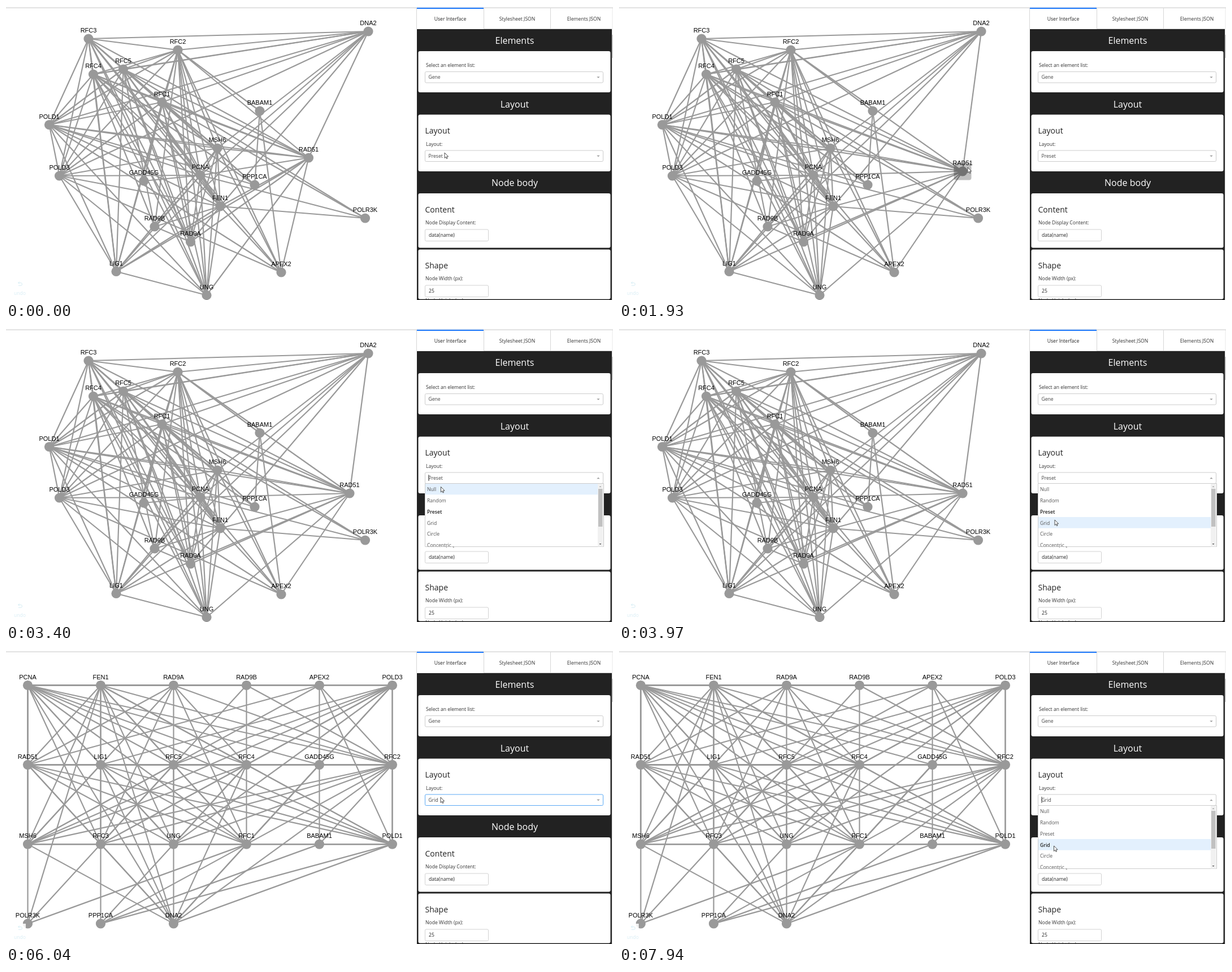
Write an HTML page with a canvas that moves like this. It is 1074x521 px and loops after 8 s.

```html
<!DOCTYPE html>
<html lang="en">
<meta charset="utf-8">
<title>Network layout editor</title>
<style>
html, body { margin: 0; width: 100%; height: 100%; overflow: hidden; background: #fff }
canvas { display: block }
</style>
<canvas id="stage" width="1074" height="521"></canvas>
<script>
const ctx = document.getElementById('stage').getContext('2d');
const LOOP = 8000, STEP = 137.3, PHASE = 1350;
const UI = '"Open Sans", sans-serif', LABEL = '"Liberation Sans", Arial, sans-serif';

// Scattered positions, listed in the reading order of the grid
const preset = {
  PCNA: [344, 300], FEN1: [379, 355], RAD9A: [326.5, 418], RAD9B: [263, 391], APEX2: [487, 472], POLD3: [94.5, 301],
  RAD51: [535.5, 269], LIG1: [195, 470.5], RFC5: [207.5, 112], RFC4: [154.5, 121], GADD45G: [244, 310], RFC2: [304, 78],
  MSH6: [374, 252], RFC3: [146, 58], UNG: [355, 512.5], RFC1: [276, 170.5], BABAM1: [449, 186], POLD1: [76.5, 210.5],
  POLR3K: [635.5, 376], PPP1CA: [440, 317], DNA2: [641, 45]
};
const names = Object.keys(preset);
const links = {
  PCNA: 'FEN1 RAD9A RAD9B APEX2 POLD3 RAD51 LIG1 RFC5 RFC4 GADD45G RFC2 MSH6 RFC3 UNG RFC1 POLD1 POLR3K DNA2',
  FEN1: 'RAD9A RAD9B APEX2 POLD3 RAD51 LIG1 RFC5 RFC4 RFC2 MSH6 RFC3 UNG RFC1 POLD1 POLR3K DNA2',
  RAD9A: 'RAD9B RFC2 RFC3 RFC4 RFC5 RFC1 RAD51 MSH6',
  RAD9B: 'RFC2 RFC5 RFC4',
  APEX2: 'POLD3 RAD51 RFC2 POLD1 BABAM1 MSH6',
  POLD3: 'LIG1 RFC5 RFC4 RFC2 MSH6 RFC3 UNG RFC1 POLD1 DNA2',
  RAD51: 'LIG1 RFC5 RFC4 RFC2 MSH6 RFC3 UNG RFC1 POLD1 DNA2',
  LIG1: 'RFC5 RFC4 RFC2 MSH6 RFC3 UNG RFC1 POLD1 DNA2',
  RFC5: 'RFC4 RFC2 RFC3 UNG RFC1 POLD1 POLR3K DNA2 MSH6',
  RFC4: 'RFC2 RFC3 UNG RFC1 POLD1 MSH6 DNA2 PPP1CA',
  GADD45G: 'RFC1',
  RFC2: 'RFC3 UNG RFC1 POLD1 MSH6 BABAM1 DNA2',
  MSH6: 'RFC3 UNG RFC1 POLD1 DNA2',
  RFC3: 'UNG RFC1 POLD1 PPP1CA DNA2',
  UNG: 'RFC1 POLD1',
  RFC1: 'POLD1 POLR3K PPP1CA DNA2',
  BABAM1: 'PPP1CA',
  POLD1: 'DNA2 PPP1CA'
};
const edges = Object.entries(links).flatMap(([a, list]) => list.split(' ').map(b => [a, b]));

// Pointer tip: time, x, y
const path = [
  [400, 776, 260], [950, 545, 262], [1090, 545, 262], [1340, 580, 257], [1490, 596, 266],
  [1900, 617, 286], [2200, 617, 286], [2580, 728, 281], [2710, 741, 278], [3050, 769, 264],
  [3320, 769, 264], [3700, 771, 338], [3950, 771, 340], [4790, 772, 342], [4910, 771, 336],
  [5150, 771, 336], [6010, 769, 261], [7000, 769, 261], [7250, 769, 286], [7930, 769.5, 347]
];
const GRAB = 1090, DROP = 2000, OPEN = 3320, PICK = 4100, SETTLED = 4600, REOPEN = 6690;
const options = ['Null', 'Random', 'Preset', 'Grid', 'Circle', 'Concentric ,'];

const clamp = v => Math.max(0, Math.min(1, v));
const mix = (a, b, p) => a + (b - a) * p;

function pointer(t) {
  const i = path.findIndex(k => k[0] > t);
  if (i === 0) return path[0].slice(1);
  if (i < 0) return path.at(-1).slice(1);
  const a = path[i - 1], b = path[i], p = (t - a[0]) / (b[0] - a[0]);
  return [mix(a[1], b[1], p), mix(a[2], b[2], p)];
}

function rect(x, y, w, h, fill, r = 0, stroke) {
  ctx.beginPath();
  ctx.roundRect(x, y, w, h, r);
  ctx.fillStyle = fill;
  ctx.fill();
  if (stroke) { ctx.lineWidth = 1; ctx.strokeStyle = stroke; ctx.stroke(); }
}

// y is the baseline
function text(s, x, y, size = 8.6, color = '#333', align = 'left', family = UI, weight = '') {
  ctx.font = `${weight} ${size}px ${family}`;
  ctx.textAlign = align;
  ctx.fillStyle = color;
  ctx.fillText(s, x, y);
}

function triangle(x, y, dir, color = '#999', r = 2.7) {
  ctx.beginPath();
  ctx.moveTo(x - r, y - dir * r / 2);
  ctx.lineTo(x + r, y - dir * r / 2);
  ctx.lineTo(x, y + dir * r / 2);
  ctx.fillStyle = color;
  ctx.fill();
}

function positions(t) {
  const p = clamp((t - PICK) / (SETTLED - PICK)), pos = {};
  names.forEach((n, i) => {
    let [x, y] = preset[n];
    if (n === 'RAD51' && t >= GRAB) {
      const [cx, cy] = pointer(Math.min(t, DROP));
      x = cx - 9;
      y = cy + 7;
    }
    pos[n] = [mix(x, 38.5 + i % 6 * 129, p), mix(y, 62.5 + Math.floor(i / 6) * 140.8, p)];
  });
  return pos;
}

function drawGraph(t) {
  const pos = positions(t);
  ctx.strokeStyle = '#999';
  ctx.lineWidth = 2.2;
  for (const [a, b] of edges) {
    ctx.beginPath();
    ctx.moveTo(...pos[a]);
    ctx.lineTo(...pos[b]);
    ctx.stroke();
  }
  for (const n of names) {
    ctx.beginPath();
    ctx.arc(...pos[n], 8.6, 0, 7);
    ctx.fillStyle = '#999';
    ctx.fill();
  }
  if (t >= GRAB && t < DROP) {
    const [x, y] = pos.RAD51;
    rect(x - 15.5, y - 15.5, 31, 31, 'rgba(0,0,0,.25)', 4);
  }
  for (const n of names) text(n, pos[n][0], pos[n][1] - 10.7, 11, '#000', 'center', LABEL);

  rect(14, 485, 21, 33, 'rgba(255,255,255,.85)');
  text('undo', 24.5, 512, 8.6, '#d9eef5', 'center');
  ctx.strokeStyle = '#d9eef5';
  ctx.lineWidth = 1;
  ctx.beginPath();
  ctx.moveTo(24, 488.5);
  ctx.lineTo(21.5, 490.5);
  ctx.lineTo(24, 493);
  ctx.moveTo(21.5, 490.5);
  ctx.lineTo(26, 490.5);
  ctx.arc(26, 493, 2.5, -Math.PI / 2, Math.PI / 2);
  ctx.lineTo(22, 495.5);
  ctx.stroke();
}

function select(y, value, open, focus) {
  rect(741.5, y - 9.5, 315, 19.5, '#fff', 2, focus ? '#5aa9f5' : '#ccc');
  text(value, 747.5, y + 3.3, 8.6, '#444');
  triangle(1048, y + .5, open ? -1 : 1);
}

function input(y, value) {
  rect(741.5, y - 10, 112, 20.5, '#fff', 2, '#d1d1d1');
  text(value, 748, y + 3.3, 8.6, '#222');
}

function drawPanel(t, open) {
  rect(727, 41, 345, 480, '#222');
  rect(726.5, 4, 345.5, 37, '#fff');
  rect(0, 2.5, 1074, 1.5, '#d8d8d8');
  for (const x of [726, 845, 963]) rect(x, 4, 1, 37, '#d6d6d6');
  rect(846, 40, 226, 1, '#d6d6d6');
  rect(727, 3, 118, 2, '#1975fa');
  text('User Interface', 786, 26.3, 8.6, '#222', 'center');
  text('Stylesheet JSON', 904.5, 26.3, 8.6, '#333', 'center');
  text('Elements JSON', 1022.5, 26.3, 8.6, '#333', 'center');
  rect(1072, 4, 2, 517, '#f4f4f4');
  rect(1072.5, 51, 1.5, 41, '#c4c4c4');

  for (const [y, bottom] of [[80, 153], [192.5, 293], [332, 428.5], [431.5, 519.5]])
    rect(729.5, y, 340, bottom - y, '#fff', 3);
  text('Elements', 900, 67, 16, '#fff', 'center');
  text('Layout', 900, 179.5, 16, '#fff', 'center');
  text('Node body', 900, 319, 16, '#fff', 'center');
  text('Layout', 741.5, 226.3, 14, '#222');
  text('Content', 741.5, 365.5, 14, '#222');
  text('Shape', 741.5, 465, 14, '#222');
  text('Select an element list:', 743, 107.5);
  text('Layout:', 743, 247.5);
  text('Node Display Content:', 742, 387.3);
  text('Node Width (px):', 742, 486.3);
  ctx.save();
  ctx.beginPath();
  ctx.rect(730, 517, 338, 2.5);
  ctx.clip();
  text('Node Height (px):', 742, 525);
  ctx.restore();
  input(406, 'data(name)');
  input(505, '25');
  select(126, 'Gene');
  select(265.5, t < PICK ? 'Preset' : 'Grid', open, t >= PICK && t < REOPEN);
}

function drawMenu(t) {
  const chosen = t < PICK ? 2 : 3, y = pointer(t)[1];
  const hover = y > 276 ? Math.floor((y - 276) / 19.8) : chosen;
  const opened = t < PICK ? OPEN : REOPEN - 60;
  if ((t - opened) % 1000 < 500) rect(747.5, 260, 1, 11, '#333');
  rect(741.5, 275.5, 316, 112, '#fff', 0, '#ccc');
  ctx.save();
  ctx.beginPath();
  ctx.rect(742, 276, 315, 111.5);
  ctx.clip();
  options.forEach((name, i) => {
    const top = 276 + i * 19.8;
    if (i === hover) rect(742, top - .5, 305, 19.8, '#e3f0fd');
    text(name, 745, top + 13.2, 8.6, i === chosen ? '#222' : '#555', 'left', UI, i === chosen ? '600' : '');
  });
  rect(1047, 276, 9.5, 112, '#f1f1f1');
  rect(1048, 285, 7.5, 67, '#c1c1c1');
  triangle(1051.5, 281, -1, '#a3a3a3', 2);
  triangle(1051.5, 383, 1, '#505050', 2);
  ctx.restore();
}

function drawPointer([x, y]) {
  const outline = [[0, 0], [0, 9.5], [2.2, 7.5], [3.6, 10.6], [5, 10], [3.7, 7], [6.6, 6.8]];
  ctx.beginPath();
  for (const [dx, dy] of outline) ctx.lineTo(x + dx, y + dy);
  ctx.closePath();
  ctx.fillStyle = '#fff';
  ctx.fill();
  ctx.strokeStyle = '#222';
  ctx.lineWidth = .8;
  ctx.stroke();
}

function draw() {
  const now = performance.now() % LOOP;
  const t = Math.max(0, PHASE + Math.floor((now - PHASE + 10) / STEP) * STEP);
  const open = t >= OPEN && t < PICK || t >= REOPEN;
  rect(0, 0, 1074, 521, '#fff');
  drawGraph(t);
  drawPanel(t, open);
  if (open) drawMenu(t);
  drawPointer(pointer(t));
  requestAnimationFrame(draw);
}
draw();
</script>
</html>
```
